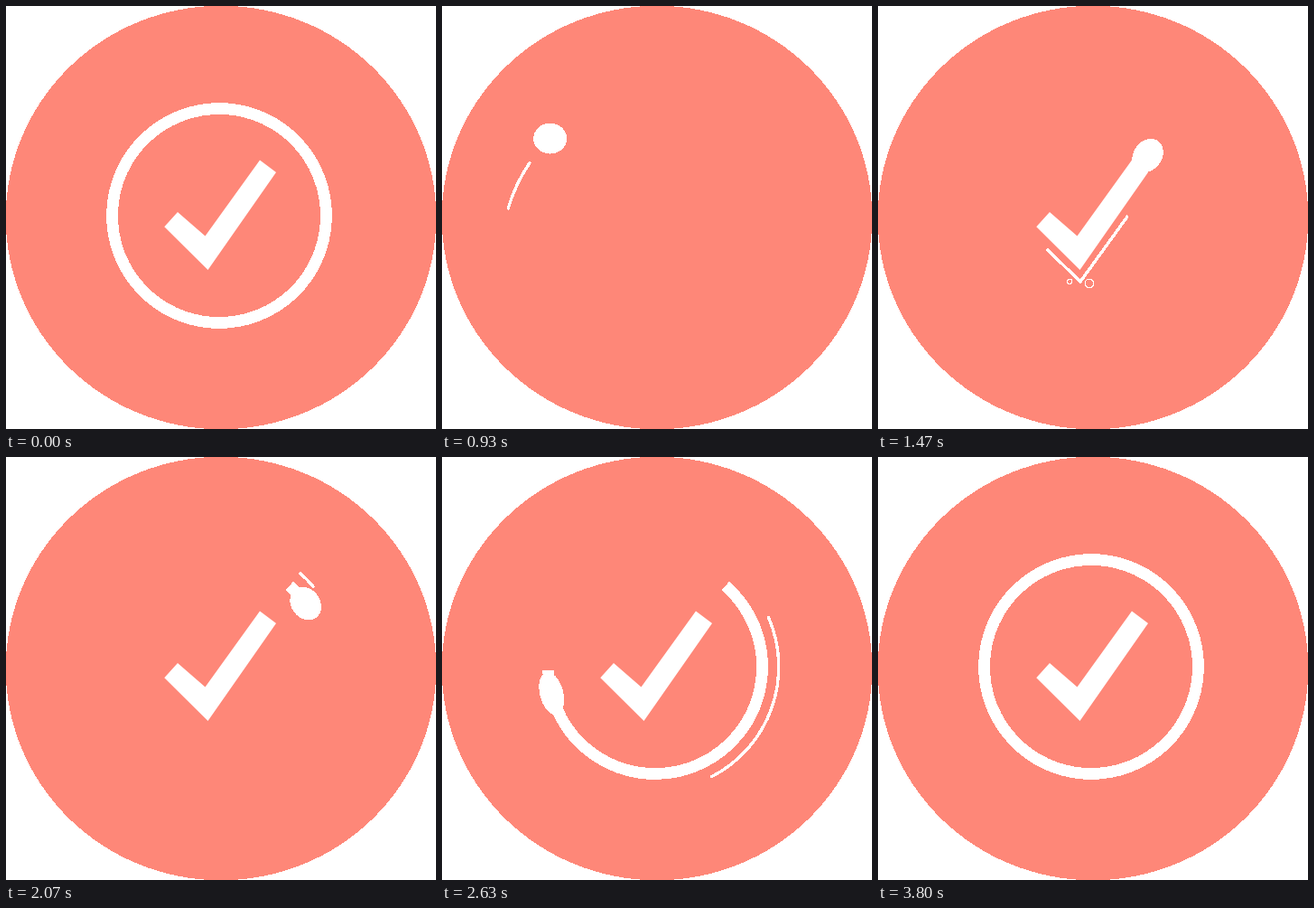
An HTML page that plays this animation: 476x468 px, repeating every 4.01 s.

```html
<!DOCTYPE html>
<html lang="en">
<head>
<meta charset="utf-8">
<title>Check mark</title>
<style>
  html, body { margin: 0; width: 100%; height: 100%; overflow: hidden; background: #fff; }
  svg { display: block; width: 100%; height: 100%; shape-rendering: crispEdges; }
  .line { fill: none; stroke: #fff; }
  .trail { stroke-width: 3.4; stroke-linecap: round; }
</style>
</head>
<body>
<svg viewBox="0 0 476 468">
  <clipPath id="tick"><path d="M175.3 244.3 190 228 220.5 254.6 281 170.5 299 184 223.5 292Z"/></clipPath>
  <ellipse cx="238" cy="234" rx="238.3" ry="234.3" fill="#fe8778"/>
  <g clip-path="url(#tick)"><path id="check" class="line" stroke-width="48" stroke-linecap="square"/></g>
  <path id="ring" class="line" stroke-width="12.8"/>
  <path id="riseTrail" class="line trail"/>
  <path id="checkTrail" class="line trail"/>
  <path id="ringTrail" class="line trail"/>
  <g id="bubbles" class="line" stroke-width="1.3"></g>
  <ellipse id="ball" fill="#fff"/>
</svg>
<script>
const LOOP = 4010, BALL = 17.7;
// When the ball rises, falls, draws the check, hops, draws the ring and is gone.
const RISE = 500, FALL = 930, CHECK = 1170, HOP = 1530, ROLL = 1930, GONE = 2730;

const riseArc = { cx: 244, cy: 274, r: 178, from: 145, to: 225.7 };
const ringArc = { cx: 236, cy: 232, r: 118.5, from: -49, to: 311 };
const outerArc = { ...ringArc, r: 136.8 };
const checkVee = { x: 222, y: 273.5, left: .962, right: 1.412, from: 183, to: 307 };
const trailVee = { x: 224, y: 305, left: .972, right: 1.385, from: 170, to: 290 };

const $ = id => document.getElementById(id);
const set = (el, attrs) => Object.entries(attrs).forEach(([k, v]) => el.setAttribute(k, v));
const mix = (a, b, u) => a + (b - a) * u;
const ramp = (t, from, to) => Math.min(1, Math.max(0, (t - from) / (to - from)));
const easeIn = (t, from, to, power) => ramp(t, from, to) ** power;
const easeOut = (t, from, to, power) => 1 - (1 - ramp(t, from, to)) ** power;

// Progress along a shape runs from 0 to 1.
function onArc({ cx, cy, r, from, to }, u) {
  const a = mix(from, to, u) * Math.PI / 180;
  return [cx + r * Math.cos(a), cy + r * Math.sin(a)];
}

function onVee(v, u) {
  const x = mix(v.from, v.to, u);
  return [x, v.y - (x < v.x ? (v.x - x) * v.left : (x - v.x) * v.right)];
}

function arcPath(arc, a, b) {
  if ((b - a) * (arc.to - arc.from) < 1) return '';
  const bend = u => `A${arc.r} ${arc.r} 0 0 1 ${onArc(arc, u)}`;
  return `M${onArc(arc, a)}${bend((a + b) / 2)}${bend(b)}`;
}

function veePath(vee, a, b) {
  if (b - a < .005) return '';
  const corner = (vee.x - vee.from) / (vee.to - vee.from);
  const stops = a < corner && corner < b ? [a, corner, b] : [a, b];
  return 'M' + stops.map(u => onVee(vee, u)).join('L');
}

const checkProgress = t => easeOut(t, CHECK, HOP, 1.5);
const rollProgress = (t, duration) => easeIn(t, ROLL, ROLL + duration, 1.75);

function ballAt(t) {
  if (t < FALL) return onArc(riseArc, easeOut(t, RISE, FALL, 2));
  if (t < CHECK) {
    const u = ramp(t, FALL, CHECK), [x, y] = onArc(riseArc, 1), [endX, endY] = onVee(checkVee, 0);
    return [mix(x, endX, u), mix(y, endY, u * u)];
  }
  if (t < HOP) return onVee(checkVee, checkProgress(t));
  if (t < ROLL) {
    const u = ramp(t, HOP, ROLL), [x, y] = onVee(checkVee, 1), [endX, endY] = onArc(ringArc, 0);
    return [mix(x, endX, u), mix(y, endY, u) - 92 * u * (1 - u)];
  }
  return onArc(ringArc, rollProgress(t, 941));
}

function drawBall(t) {
  const [x, y] = ballAt(t), [px, py] = ballAt(t - 5), [nx, ny] = ballAt(t + 5);
  const dx = nx - px, dy = ny - py;
  const stretch = 1 + Math.hypot(dx, dy) / 10 * .33;
  const r = BALL * mix(.4, 1, ramp(t, RISE, FALL)) * (1 - ramp(t, GONE - 100, GONE));
  set($('ball'), {
    rx: r * stretch, ry: r / stretch,
    transform: `translate(${x} ${y}) rotate(${Math.atan2(dy, dx) * 180 / Math.PI})`,
    visibility: t >= RISE && t < GONE ? 'visible' : 'hidden'
  });
}

// A small and a large bubble splash out where each trail turns or ends.
const splash = (born, from, small, large) => [
  { born, from, to: small, r: 2.6, life: 630 },
  { born, from, to: large, r: 4.8, life: 430 }
];
const bubbles = [
  ...splash(1370, [224, 300], [212, 305], [234, 307]),
  ...splash(3170, [325, 129], [330, 137.5], [335.5, 130])
].map(b => {
  const el = document.createElementNS('http://www.w3.org/2000/svg', 'circle');
  $('bubbles').append(el);
  return { ...b, el };
});

function drawBubble({ el, born, from, to, r, life }, t) {
  const u = easeOut(t, born, born + 130, 3);
  const size = r * u * (1 - ramp(t, born + life - 140, born + life));
  set(el, {
    cx: mix(from[0], to[0], u), cy: mix(from[1], to[1], u), r: size,
    visibility: size > .1 ? 'visible' : 'hidden'
  });
}

function render(t) {
  const resting = t < RISE;
  const draw = (id, d) => $(id).setAttribute('d', d);
  draw('check', veePath(checkVee, 0, resting ? 1 : checkProgress(t)));
  draw('ring', arcPath(ringArc, 0, resting ? 1 : rollProgress(t, 911)));
  draw('riseTrail', arcPath(riseArc, easeIn(t, RISE, 1000, 3), ramp(t, RISE, 1000)));
  draw('checkTrail', veePath(trailVee, easeIn(t, 1200, 1708, 3), ramp(t, 1200, 1506)));
  draw('ringTrail', arcPath(outerArc, easeIn(t, 2146, 3317, 3), easeIn(t, 1660, 3092, 3)));
  bubbles.forEach(b => drawBubble(b, t));
  drawBall(t);
}

// Thirty pictures a second, with times rounded to 10 ms.
const stepTime = ms => Math.round(Math.floor(ms * .03 + .11) * 10 / 3) * 10;

let start;
function tick(now) {
  start ??= now;
  render(stepTime((now - start) % LOOP));
  requestAnimationFrame(tick);
}
render(0);
requestAnimationFrame(tick);
</script>
</body>
</html>
```
